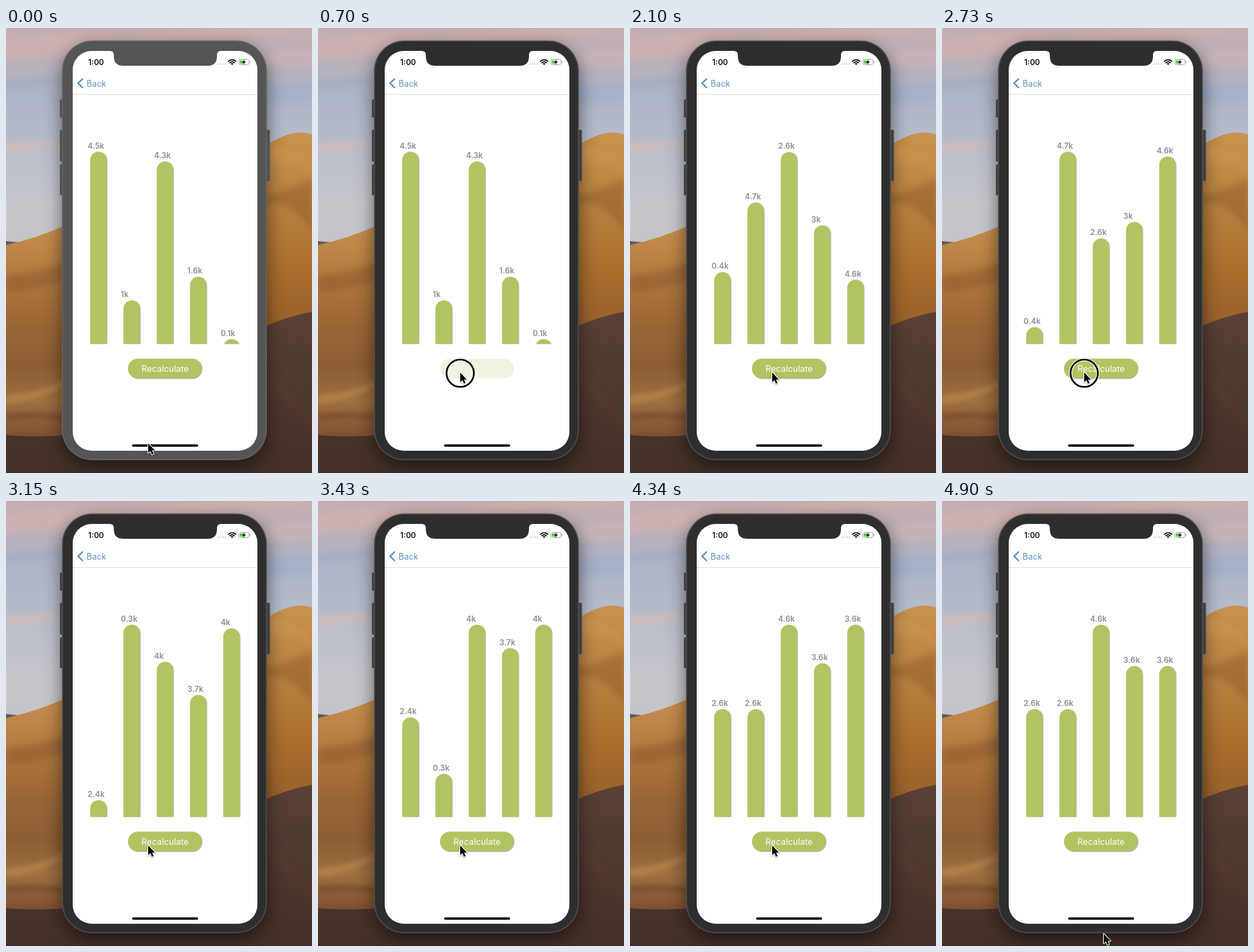
Write an HTML page with a canvas that moves like this. It is 454 px wide and 660 px high and loops after 4.97 s.

```html
<!DOCTYPE html>
<html lang="en">
<head>
<meta charset="utf-8">
<title>Bar chart</title>
<style>
html, body { margin: 0; width: 100%; height: 100%; overflow: hidden; background: #4a332c; }
canvas { display: block; width: 454px; height: 660px; }
</style>
</head>
<body>
<canvas id="stage" width="454" height="660"></canvas>
<script>
const W = 454, H = 660, LOOP = 4970, STEP = 70;
const FONT = 'Inter, "Liberation Sans", sans-serif';
const GREEN = '#b1c462';
const BASE = 468.5, FULL = 285;
const ctx = document.getElementById('stage').getContext('2d');

// Values in thousands; starts: when each bar begins to move.
const rounds = [
  { at: -1000, values: [4.5, 1.02, 4.27, 1.57, 0.11], starts: [-1000, -1000, -1000, -1000, -1000] },
  { at: 770, values: [3.1, 3.2, 4.7, 2.9, 1.57], starts: [1332, 1201, 1000, 1292, 1068] },
  { at: 1820, values: [0.41, 4.7, 2.58, 2.98, 4.58], starts: [1900, 1960, 2060, 2130, 2200] },
  { at: 2860, values: [2.4, 0.3, 4, 3.7, 4], starts: [3167, 3167, 2940, 3167, 2990] },
  { at: 3910, values: [2.58, 2.58, 4.6, 3.61, 3.61], starts: [3910, 3925, 3940, 4057, 4340] }
];
const presses = [[490, 770], [1680, 1820], [2700, 2860], [3710, 3910]];

const clamp = v => Math.max(0, Math.min(1, v));
const mix = (a, b, k) => a + (b - a) * k;
const ease = u => u < 0.5 ? 4 * u ** 3 : 1 - 4 * (1 - u) ** 3;

function box(c, x, y, w, h, r, fill) {
  c.beginPath();
  c.roundRect(x, y, w, h, r);
  c.fillStyle = fill;
  c.fill();
}

function label(text, x, y, size, weight, color, align = 'left') {
  ctx.font = `${weight} ${size}px ${FONT}`;
  ctx.textAlign = align;
  ctx.fillStyle = color;
  ctx.fillText(text, x, y);
}

function gradient(c, y0, y1, colors) {
  const g = c.createLinearGradient(0, y0, 0, y1);
  colors.forEach((color, i) => g.addColorStop(i / (colors.length - 1), color));
  return g;
}

function paintDesert() {
  const layer = document.createElement('canvas');
  layer.width = W;
  layer.height = H;
  const c = layer.getContext('2d');
  const shape = (path, fill, blur = 0) => {
    c.filter = blur ? `blur(${blur}px)` : 'none';
    c.fillStyle = fill;
    c.fill(new Path2D(path));
    c.filter = 'none';
  };
  const cloud = (x, y, rx, ry, color) => {
    c.filter = 'blur(5px)';
    c.fillStyle = color;
    c.beginPath();
    c.ellipse(x, y, rx, ry, -0.08, 0, 7);
    c.fill();
    c.filter = 'none';
  };

  c.fillStyle = gradient(c, 0, 320, ['#c5adb0', '#b8b0bb', '#acb5c8', '#b5bbc9', '#c0c2ca', '#c5c7cd', '#c4c5c9']);
  c.fillRect(0, 0, W, H);
  cloud(60, 28, 110, 16, 'rgba(214,178,172,.6)');
  cloud(290, 10, 180, 9, 'rgba(213,178,170,.6)');
  cloud(430, 45, 50, 13, 'rgba(207,181,181,.6)');
  cloud(30, 82, 55, 5, 'rgba(150,167,196,.6)');
  cloud(430, 95, 60, 14, 'rgba(157,174,203,.55)');
  cloud(20, 176, 60, 6, 'rgba(219,186,176,.7)');

  shape('M0 316 L20 318 L40 322 L0 326Z', '#6b5658');
  // Right dune with its shaded face
  shape('M300 250 C345 205 395 157 434 155 Q446 155 454 158 V660 H300Z',
    gradient(c, 155, 440, ['#c8924f', '#bd8644', '#b37a39', '#a96d2e', '#98602b']));
  shape('M380 254 Q420 236 454 224 V300 Q420 250 380 262Z', 'rgba(112,68,28,.28)', 4);
  shape('M380 176 Q415 170 454 196 V215 Q420 190 380 200Z', 'rgba(218,160,88,.3)', 5);
  // Left dune
  shape('M0 322 Q45 312 90 292 L330 240 V660 H0Z',
    gradient(c, 295, 605, ['#c58e4d', '#b98043', '#a9713a', '#986435', '#8d5c33', '#a0703f', '#7e5031']));
  shape('M0 368 Q50 362 90 346 V372 Q45 390 0 390Z', 'rgba(110,66,32,.28)', 4);
  shape('M0 545 Q45 540 90 522 V530 Q45 554 0 558Z', 'rgba(200,150,93,.4)', 3);
  shape('M0 572 Q45 566 90 574 V582 Q45 575 0 582Z', 'rgba(84,49,32,.35)', 3);
  // Foreground shadow
  shape('M0 604 Q50 608 100 603 L330 470 Q400 430 454 421 V660 H0Z',
    gradient(c, 420, 660, ['#5b4134', '#503a31', '#4a342c', '#432f29']));
  shape('M380 500 Q420 535 454 580 V600 Q420 548 380 520Z', 'rgba(105,69,47,.25)', 6);

  c.save();
  c.shadowColor = 'rgba(0,0,0,.55)';
  c.shadowBlur = 28;
  c.shadowOffsetY = 9;
  box(c, 84, 20, 302, 620, 44, '#333');
  c.restore();
  return layer;
}
const desert = paintDesert();

function drawStatus() {
  label('1:00', 122, 55, 11.3, 600, '#111');
  for (let i = 0; i < 4; i++) {
    ctx.beginPath();
    ctx.arc(315 + i * 3.5, 53.5, 1, 0, 7);
    ctx.fillStyle = '#c4c4c4';
    ctx.fill();
  }
  ctx.strokeStyle = '#111';
  ctx.lineWidth = 1.8;
  for (const r of [4.3, 7.4]) {
    ctx.beginPath();
    ctx.arc(335.5, 54.5, r, -Math.PI * 0.76, -Math.PI * 0.24);
    ctx.stroke();
  }
  ctx.fillStyle = '#111';
  ctx.beginPath();
  ctx.moveTo(335.5, 55);
  ctx.arc(335.5, 54.5, 2.4, -Math.PI * 0.78, -Math.PI * 0.22);
  ctx.fill();

  box(ctx, 345.5, 46.5, 15, 8, 2.3, '#fff');
  ctx.strokeStyle = '#aaa';
  ctx.lineWidth = 1;
  ctx.stroke();
  box(ctx, 347, 48, 5.5, 5, 1, '#6cc455');
  box(ctx, 361.3, 49, 1.2, 3, 0.6, '#aaa');
  ctx.fillStyle = '#111';
  ctx.fill(new Path2D('M354.3 46.5 L350.2 51.2 H352.7 L351.8 54.7 L356 49.8 H353.5Z'));
}

function drawPhone(active) {
  const shell = active ? '#2e2e2e' : '#555';
  const side = active ? '#404144' : '#515254';
  for (const [x, y, h] of [[80, 106, 27], [80, 151, 47], [80, 202, 46], [385, 151, 76]])
    box(ctx, x, y, 6.5, h, 1.5, side);
  box(ctx, 83, 18.5, 304, 622.5, 45, active ? '#505152' : '#656565');
  box(ctx, 84.5, 20, 301, 619.5, 43.5, shell);
  box(ctx, 99, 34, 274, 593, 28, '#fff');
  ctx.fillStyle = shell;
  ctx.fill(new Path2D('M154 33 V34 Q160 34 160 40 V42 Q160 56 174 56 H299 Q313 56 313 42 V40 Q313 34 319 34 V33Z'));
  drawStatus();

  ctx.strokeStyle = '#4f8bc4';
  ctx.lineWidth = 2;
  ctx.lineCap = 'round';
  ctx.stroke(new Path2D('M113.5 75.5 L107 82 L113.5 88.5'));
  label('Back', 119.5, 86.5, 12.5, 400, '#5c91c2');
  ctx.fillStyle = '#dedede';
  ctx.fillRect(99, 98, 274, 1);
  box(ctx, 187, 617.5, 98, 3.5, 1.75, '#000');
}

function barHeight(i, t) {
  let height = 0;
  for (const { values, starts } of rounds) {
    const goal = values[i] / Math.max(...values) * FULL;
    height = mix(height, goal, ease(clamp((t - starts[i]) / 400)));
  }
  return height;
}

function drawBars(t) {
  const { values } = rounds.filter(r => r.at <= t).pop();
  values.forEach((value, i) => {
    const x = 125 + i * 49.35, h = barHeight(i, t), top = BASE - h;
    ctx.save();
    ctx.beginPath();
    ctx.rect(x - 4, top - 4, 33, h + 4);
    ctx.clip();
    ctx.shadowColor = 'rgba(0,0,0,.35)';
    ctx.shadowBlur = 1.5;
    ctx.shadowOffsetX = 0.8;
    ctx.shadowOffsetY = 0.5;
    box(ctx, x, top, 24.4, h + 26, 12.2, GREEN);
    ctx.restore();
    label(+value.toFixed(1) + 'k', x - 4, top - 4.7, 11.6, 600, '#8d8d92');
  });
}

function drawButton(t) {
  let fade = 0;
  for (const [down, up] of presses) {
    const held = clamp((Math.min(t, up) - down - 70) / 100);
    fade = Math.max(fade, held * (1 - clamp((t - up) / 200)));
  }
  ctx.save();
  ctx.globalAlpha = 1 - 0.8 * fade;
  ctx.shadowColor = `rgba(0,0,0,${0.4 * (1 - fade)})`;
  ctx.shadowBlur = 1.5;
  ctx.shadowOffsetX = 0.7;
  ctx.shadowOffsetY = 0.8;
  box(ctx, 181, 490.5, 109.5, 29, 14.5, GREEN);
  ctx.shadowColor = 'transparent';
  label('Recalculate', 236, 510, 12.8, 400, '#fff', 'center');
  ctx.restore();
}

function drawPointer(t) {
  const arrive = ease(clamp(t / 420)), leave = ease(clamp((t - 4480) / 400));
  const x = mix(211, 240, leave);
  const y = mix(mix(616, 511, arrive), 642, leave);
  if (presses.some(([down, up]) => t >= down && t < up)) {
    ctx.beginPath();
    ctx.arc(211, 512, 20.3, 0, 7);
    ctx.strokeStyle = 'rgba(255,255,255,.85)';
    ctx.lineWidth = 5;
    ctx.stroke();
    ctx.strokeStyle = '#000';
    ctx.lineWidth = 2.6;
    ctx.stroke();
  }
  ctx.save();
  ctx.translate(x, y);
  const arrow = new Path2D('M0 0 V14.2 L3.2 11.3 L5.6 16.5 L8 15.4 L5.7 10.4 H10Z');
  ctx.shadowColor = 'rgba(0,0,0,.35)';
  ctx.shadowBlur = 2;
  ctx.shadowOffsetY = 1;
  ctx.strokeStyle = '#fff';
  ctx.lineWidth = 2;
  ctx.lineJoin = 'round';
  ctx.stroke(arrow);
  ctx.shadowColor = 'transparent';
  ctx.fillStyle = '#000';
  ctx.fill(arrow);
  ctx.restore();
}

const begin = performance.now();
function draw(now) {
  const t = Math.floor((Math.max(0, now - begin) % LOOP) / STEP) * STEP;
  ctx.drawImage(desert, 0, 0);
  drawPhone(t >= presses[0][0]);
  drawBars(t);
  drawButton(t);
  drawPointer(t);
  requestAnimationFrame(draw);
}
draw(begin);
</script>
</body>
</html>
```
